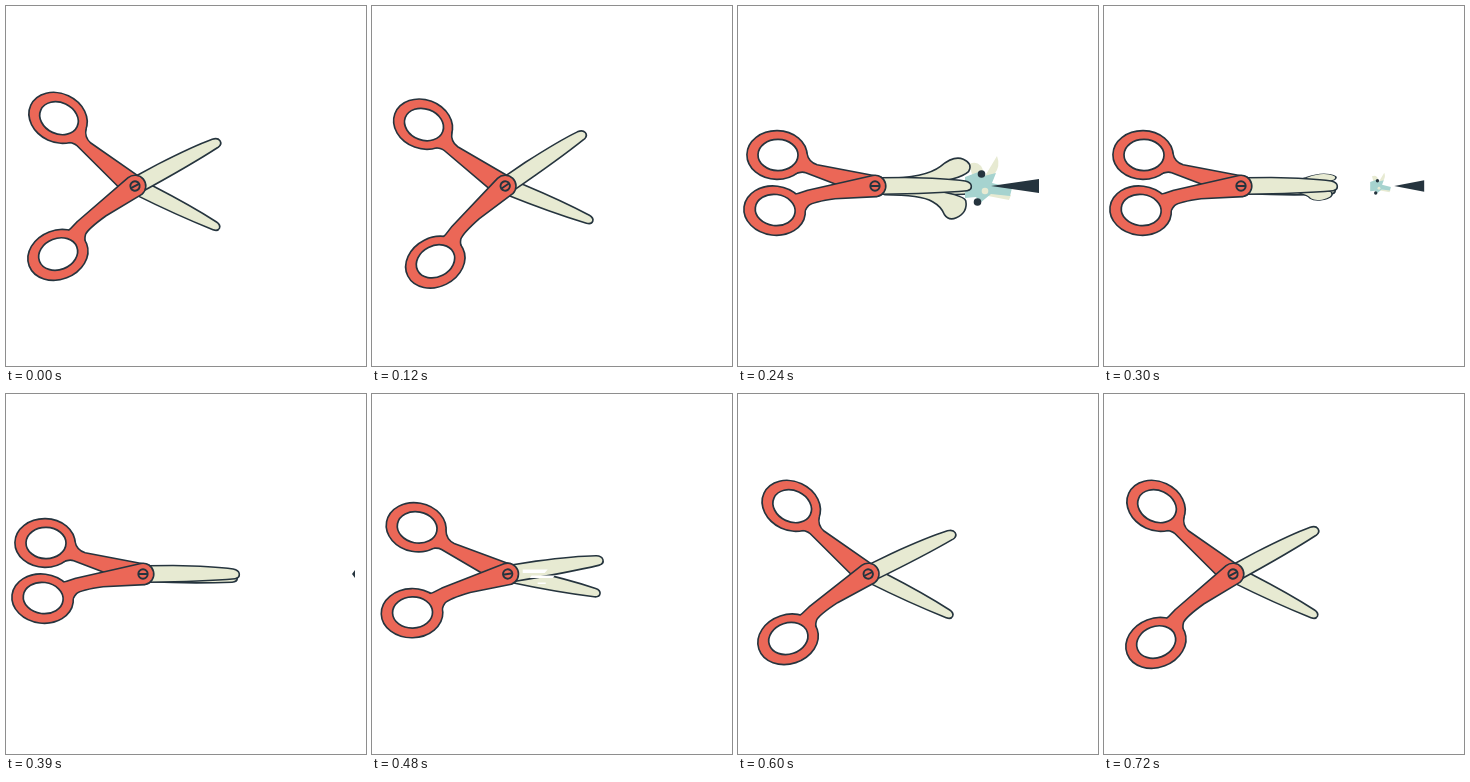
These frames come from a looping animation (360x360 px, 0.93 s). An HTML page with a canvas:

```html
<!DOCTYPE html>
<html lang="en">
<head>
<meta charset="utf-8">
<title>Scissors</title>
<style>
html, body { margin: 0; width: 100%; height: 100%; overflow: hidden; background: #fff; }
canvas { display: block; width: 360px; height: 360px; }
</style>
</head>
<body>
<canvas id="stage" width="360" height="360"></canvas>
<script>
const ctx = document.getElementById('stage').getContext('2d');
const RED = '#eb6757', CREAM = '#e7ead2', TEAL = '#a6d3cf', DARK = '#25343e';
const LOOP = 930, STEP = 30, SNAP = 240, CLOSED = 390;

// time, pivot x, front angle, back angle
const KEYS = [
  [0, 129, 28, 24], [60, 130.5, 30, 22.5], [120, 133.2, 33.7, 19.4],
  [180, 135.5, 21, 12], [240, 137, 0, 0], [390, 137, 0, 0],
  [480, 135.7, 8.5, 9.5], [540, 133, 18, 18], [600, 130.2, 25.4, 24],
  [720, 129, 28, 24], [930, 129, 28, 24]
];

const path = d => new Path2D(d);
function oval(x, y, rx, ry, tilt = 0) {
  const p = new Path2D();
  p.ellipse(x, y, rx, ry, tilt * Math.PI / 180, 0, 7);
  return p;
}

// Halves are drawn closed, around the pivot
const front = {
  blade: path('M5,-7.5 L30,-7.7 Q70,-7 90,-4.2 C97,-3 97,3 92,4 Q60,6.8 5,7.5Z'),
  handle: [oval(-100.4, 24.6, 30, 23.8, 7),
    path('M-86,10 Q-77,9 -67,5 L-2,-9.8 A10,10 0 0 1 2,9.8 L-40,12 Q-62,15 -67,19 Q-71,23 -72,30 L-86,20Z')],
  hole: oval(-99.8, 24, 20, 15.6, 7)
};
const back = {
  blade: path('M5,-6.5 L17,-6.5 Q60,-4 89,0.5 C95,1.5 95,7 89,7.4 Q50,9 5,7Z'),
  handle: [oval(-98, -31, 29.3, 23.6, 1),
    path('M-83,-12 Q-74,-16 -69,-14 L-14,7 L5,8.5 L5,-8.5 L-58,-20.5 Q-67,-23 -69,-33 L-84,-30Z')],
  hole: oval(-97, -31, 20, 15.6, 1)
};
const lobes = [
  path('M10,-7 Q50,-7 66,-19 Q79,-30 88,-26 Q97,-22 93,-15 Q84,-7 50,-3Z'),
  path('M10,8 Q46,8 58,15 Q67,20 70,28 Q74,34 81,31 Q92,26 90,15 Q88,9 50,4Z')
];
const splash = [
  [CREAM, path('M94,-22 Q106,-27 109,-12 L98,-8Z')],
  [CREAM, path('M110,-10 L122,-30 Q126,-20 119,-11 L114,-7Z')],
  [CREAM, path('M108,6 L136,9 L134,14 L113,10Z')],
  [TEAL, path('M90,-9 L106,-15 L109,-10 L121,-13 L117,-3 L137,2 L135,10 L116,8 L105,17 L101,11 L90,12Z')],
  [DARK, oval(106.5, -12, 3.8, 3.8)],
  [DARK, oval(102.5, 16, 3.8, 3.8)],
  [CREAM, oval(110, 5, 3.3, 3.3)]
];
const glints = path('M15,-4.5 H40 L37,-1 H15Z M24,1.5 H47 L45,4 H22Z M30,8.5 H38 V10 H30Z');

function fill(shape, color) {
  ctx.fillStyle = color;
  ctx.fill(shape);
}

function ink(shapes, color, width = 3.2) {
  ctx.lineWidth = width;
  shapes.forEach(s => ctx.stroke(s));
  shapes.forEach(s => fill(s, color));
}

function rotated(x, degrees, draw) {
  ctx.save();
  ctx.translate(x, 180);
  ctx.rotate(degrees * Math.PI / 180);
  draw();
  ctx.restore();
}

function handle(half) {
  ink(half.handle, RED);
  fill(half.hole, '#fff');
  ctx.lineWidth = 1.7;
  ctx.stroke(half.hole);
}

function pose(t) {
  const i = KEYS.findIndex(k => k[0] > t);
  const a = KEYS[i - 1], b = KEYS[i], u = (t - a[0]) / (b[0] - a[0]);
  return a.map((v, n) => v + (b[n] - v) * u);
}

function burst(x, u) {
  const fade = Math.max(0, 1 - u * 1.4);
  rotated(x, 0, () => {
    if (fade) {
      ctx.save();
      ctx.translate(110 + 70 * u, 0);
      ctx.scale(fade, fade);
      ctx.translate(-110, 0);
      splash.forEach(([color, shape]) => fill(shape, color));
      ctx.restore();
      ctx.save();
      ctx.scale(1, fade);
      ink(lobes, CREAM);
      ctx.restore();
    }
    const tail = 116 + 93 * u, head = 164 + 48 * u, h = 7 - 3 * u;
    fill(path(`M${tail},0 L${head},${-h} L${head},${h}Z`), DARK);
  });
}

function draw(t) {
  const [, x, frontAngle, backAngle] = pose(t);
  ctx.clearRect(0, 0, 360, 360);
  ctx.strokeStyle = DARK;
  ctx.lineJoin = ctx.lineCap = 'round';

  rotated(x, backAngle, () => {
    ink([back.blade], CREAM);
    handle(back);
  });
  if (t >= SNAP && t <= CLOSED) burst(x, (t - SNAP) / (CLOSED - SNAP));
  rotated(x, -frontAngle, () => ink([front.blade], CREAM));
  if (t > CLOSED && t < 540) rotated(x, 0, () => fill(glints, '#fff'));
  rotated(x, -frontAngle, () => {
    handle(front);
    ctx.lineWidth = 1.9;
    ctx.stroke(oval(0, 0, 4.7, 4.7));
    ctx.stroke(path('M-3.5,0 H3.5'));
  });
}

function tick(now) {
  let t = Math.floor(now % LOOP / STEP) * STEP;
  if (t === 270 || t === 630) t -= STEP; // poses held for two steps
  draw(t);
  requestAnimationFrame(tick);
}
tick(0);
</script>
</body>
</html>
```
